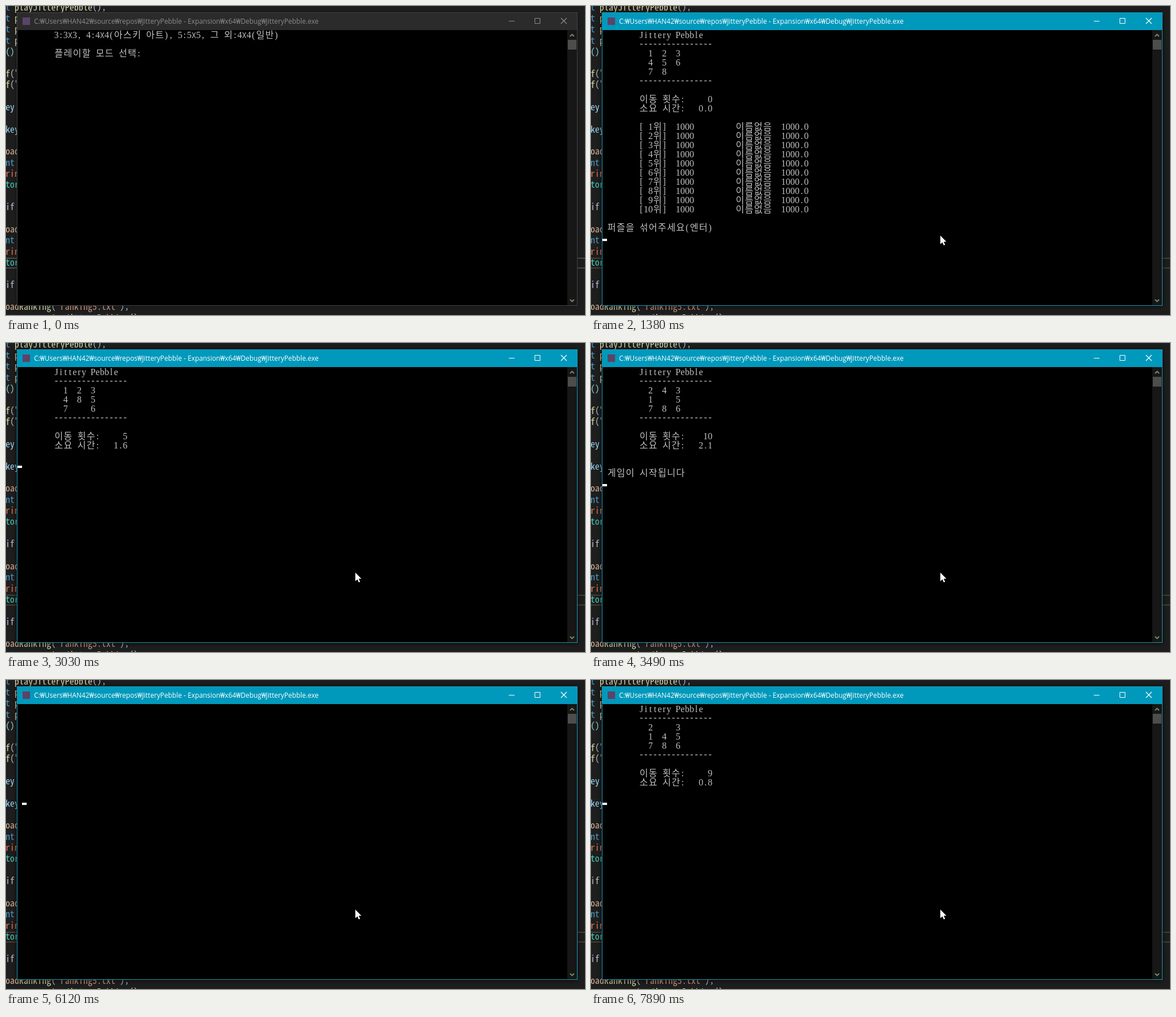
An HTML page for the animation above (8000 ms loop, 1011 px wide and 539 px high).

```html
<!DOCTYPE html>
<html lang="ko">
<head>
<meta charset="utf-8">
<title>Console puzzle</title>
<style>
  html, body { margin: 0; width: 100%; height: 100%; overflow: hidden; background: #1e1e1e; }
  svg { display: block; width: 1011px; height: 539px; --bar: #2b2b2b; --edge: #424242; --ink: #8c8c8c; --mark: #4b4b4b; --shade: .35; }
  svg.on { --bar: #0099bc; --edge: #1a95b4; --ink: #fff; --mark: #464030; --shade: .7; }
  text { white-space: pre; }
  #editor text { font: 300 15.5px "Noto Sans Mono CJK KR", "Noto Sans CJK KR", "Noto Sans CJK", monospace; text-anchor: middle; }
  #screen text { font: 300 16px "Liberation Serif", "Noto Sans CJK KR", "Noto Sans CJK", serif; fill: #c0c0c0; text-anchor: middle; }
  #screen .wide { font: 13.5px "Noto Sans Mono", monospace; }
  #title { font: 11.84px "Open Sans", "Noto Sans", sans-serif; fill: var(--ink); }
  #frame { fill: var(--edge); filter: drop-shadow(0 1px 5px rgba(0, 0, 0, var(--shade))); }
  #buttons { fill: none; stroke: var(--ink); }
  .bar { fill: var(--bar); }
  .mark { fill: var(--mark); }
</style>
</head>
<body>
<svg id="stage" viewBox="0 0 1011 539">
  <rect width="1011" height="539" fill="#1e1e1e"/>
  <rect class="mark" y="439" width="1011" height="2"/>
  <rect class="mark" y="456" width="1011" height="2"/>
  <g id="editor"></g>

  <rect id="frame" x="19" y="11" width="979" height="512"/>
  <rect class="bar" x="20" y="12" width="977" height="30"/>
  <rect x="20" y="42" width="977" height="480" fill="#000"/>
  <rect x="29" y="20" width="13" height="13" fill="#5b4468"/>
  <text id="title" x="49" y="31">C:₩Users₩HAN42₩source₩repos₩JitteryPebble - Expansion₩x64₩Debug₩JitteryPebble.exe</text>
  <g id="buttons">
    <path d="M878 26.5h10M923.5 21.5h9v9h-9z"/>
    <path d="M969 21l10 10M979 21l-10 10" stroke-width="1.2"/>
  </g>

  <rect x="980" y="42" width="17" height="480" fill="#171717"/>
  <rect x="981" y="59" width="15" height="17" fill="#4d4d4d"/>
  <path d="M985 53l3.5-3.5 3.5 3.5M985 512l3.5 3.5 3.5-3.5" fill="none" stroke="#6f9468" stroke-width="1.8"/>

  <g id="screen"></g>
  <rect id="caret" width="8" height="4" fill="#fff"/>
  <circle id="click" cx="609" cy="398" r="12" fill="#7f7a04"/>
  <path id="pointer" d="M0 0.5V15.5l3.6-3.3 2.4 5.3 2.3-1-2.4-5.2h4.6z" fill="#fff"/>
</svg>
<script>
const LOOP = 8000, CELL = 8, ROW = 16, LEFT = 20, TOP = 42;
const $ = id => document.getElementById(id);

// Centres of the grid cells a string fills; Hangul takes two cells.
function centres(str, x) {
  return [...str].map(ch => {
    const half = ch.charCodeAt(0) > 0x1100 ? CELL : CELL / 2;
    x += half * 2;
    return x - half;
  }).join(' ');
}

// Editor behind the window: [line, [text, colour]...]
const BLUE = '#4a9cc8', PALE = '#dcdcaa', TEAL = '#45d0bd', RED = '#e87858',
      SAND = '#dcb49a', SKY = '#9cdcfe', GREY = '#b4c0d4', RUST = '#d69d85';
const load = ['oad', SAND], int = ['nt', BLUE], print = ['rin', RED], store = ['tor', TEAL];
const code = [
  [0, ['t ', BLUE], ['playJitteryPebble', PALE], ['();', GREY]],
  ...[1, 2, 3].map(n => [n, ['t ', BLUE], ['p', PALE]]),
  [4, ['()', '#8fd6d6']],
  ...[6, 7].map(n => [n, ['f', PALE], ['(', GREY], ['"', RUST]]),
  [9, ['ey', SKY]], [11, ['key', SKY]],
  [13, load], [14, int], [15, print], [16, store], [18, ['if', GREY]],
  [20, load], [21, int], [22, print], [23, store], [25, ['if', GREY]],
  [27, load, ['Ranking', PALE], ['(', GREY], ['"ranking5.txt"', RUST], [');', GREY]],
  [28, int, [' res = ', SKY], ['playJitteryPebble5', PALE], ['()', GREY]]
];
$('editor').innerHTML = code.map(([n, ...parts]) =>
  `<text x="${centres(parts.map(p => p[0]).join(''), -1)}" y="${7.5 + n * 19.37}">` +
  parts.map(([s, c]) => `<tspan fill="${c}">${s}</tspan>`).join('') + '</text>').join('');

function textLine([row, col, str, dy = 0]) {
  const body = str.replace(/X/g, '<tspan class="wide">X</tspan>');
  return `<text x="${centres(str, LEFT + col * CELL)}" y="${TOP + 14 + row * ROW + dy}">${body}</text>`;
}

// Boards come from the path of the empty square.
function slide(board, to) {
  const b = [...board], from = b.indexOf(' ');
  [b[from], b[to]] = [b[to], ' '];
  return b.join('');
}
const walk = (start, path) => path.reduce((all, p) => [...all, slide(all.at(-1), p)], [start]);
const mixed = walk('12345678 ', [5, 2, 5, 4, 7, 4, 3, 0, 1, 4]);
const solving = walk(mixed[10], [1, 0, 3, 4]);

const RULE = '-'.repeat(16);
function game(board, moves, secs, ...extra) {
  const rows = [0, 1, 2].map(r =>
    [r + 2, 8, [...board.slice(r * 3, r * 3 + 3)].map(c => '  ' + c).join('')]);
  return [
    [0, 8, 'Jittery Pebble'], [1, 8, RULE, -1.5], ...rows, [5, 8, RULE, -1.5],
    [7, 8, '이동 횟수:' + String(moves).padStart(6)],
    [8, 8, '소요 시간:' + secs.toFixed(1).padStart(6)],
    ...extra
  ];
}

const menu = [[0, 8, '3:3X3, 4:4X4(아스키 아트), 5:5X5, 그 외:4X4(일반)'], [2, 8, '플레이할 모드 선택:']];
const ranking = Array.from({ length: 10 }, (_, i) =>
  [10 + i, 8, `[${String(i + 1).padStart(2)}위]  1000         이름없음  1000.0`]);
const shufflePrompt = [21, 1, '퍼즐을 섞어주세요(엔터)'];
const startNote = [11, 1, '게임이 시작됩니다'];

// Steps: time, lines, caret [col, row]
const steps = [];
const add = (time, lines, caret) => steps.push({ time, lines, caret });
const home = [0, 10];

function shuffle(start, gap, count, secs) {
  for (let k = 1; k <= count; k++) {
    const at = start + gap * (k - 1);
    if (k % 4 === 0) add(at - 35, [], [0, 0]);
    add(at, game(mixed[k], k, secs + (k - 1) / 10), home);
  }
}

add(0, menu);
add(1050, menu, [8, 3]);
const opening = game(mixed[0], 0, 0, ...ranking, shufflePrompt);
add(1380, opening, [0, 22]);
add(2110, opening);
shuffle(2570, 94, 10, 1.2);
add(3490, game(mixed[10], 10, 2.1, startNote), [0, 12]);
add(4210, game(mixed[10], 0, 0), home);
[4670, 5000, 5260, 5790].forEach((at, i) =>
  add(at, game(solving[i + 1], i + 1, (at - 4240) / 1000), home));
add(6120, [], [1, 10]);
add(6190, game(mixed[0], 0, 0), home);
add(6380, game(mixed[0], 0, 0, startNote), [0, 12]);
add(7100, [], [0, 0]);
shuffle(7170, 90, 9, 0);

// Pointer: time, x, y
const pointerPath = [[70, 928, 521], [140, 760, 456], [200, 650, 415], [270, 610, 400]];
const show = (el, on) => el.setAttribute('visibility', on ? 'visible' : 'hidden');

let current;
function draw(t) {
  const step = steps.findLast(s => s.time <= t);
  if (step !== current) {
    current = step;
    $('screen').innerHTML = step.lines.map(textLine).join('');
    show($('caret'), step.caret);
    if (step.caret) {
      $('caret').setAttribute('x', LEFT + step.caret[0] * CELL);
      $('caret').setAttribute('y', TOP + step.caret[1] * ROW + 12);
    }
  }
  $('stage').classList.toggle('on', t >= 530);
  show($('click'), t >= 530 && t < 590);
  const spot = pointerPath.findLast(p => p[0] <= t);
  show($('pointer'), spot);
  if (spot) $('pointer').setAttribute('transform', `translate(${spot[1]} ${spot[2]})`);
}

const began = performance.now();
function tick() {
  draw((performance.now() - began) % LOOP);
  requestAnimationFrame(tick);
}
tick();
</script>
</body>
</html>
```
